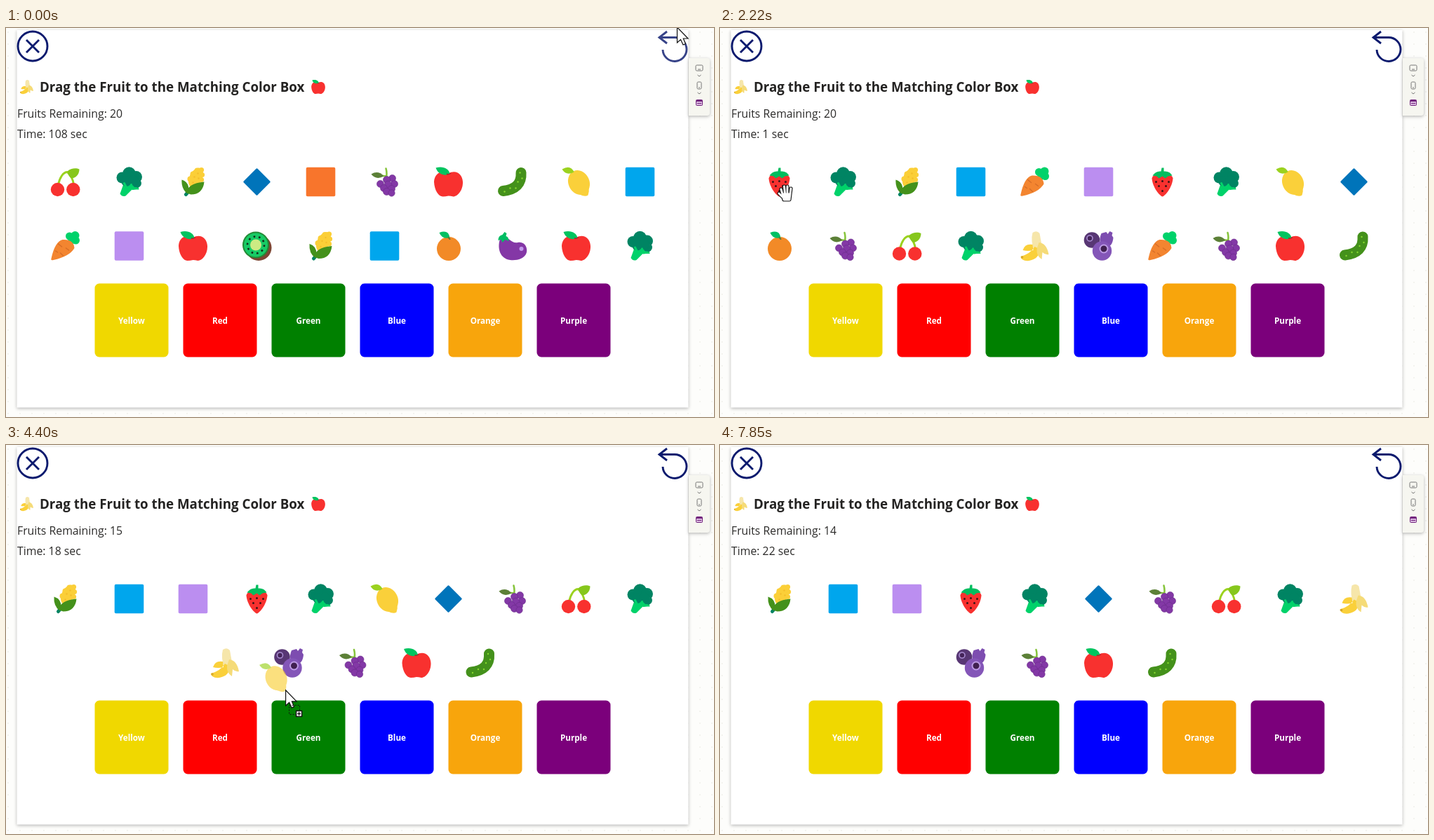
These frames come from a looping animation (1009 by 555 pixels, 8 s). An HTML page:

```html
<!DOCTYPE html>
<html lang="en">
<head>
<meta charset="utf-8">
<title>Fruit color game</title>
<style>
html, body { margin: 0; width: 100%; height: 100%; overflow: hidden; background: #fdfdfb; }
svg { display: block; width: 1009px; height: 555px; font-family: "Open Sans", sans-serif; }
.sheet { filter: drop-shadow(0 1px 2px #0003) drop-shadow(0 2px 2px #8883); }
.info { font-size: 15.8px; fill: #2b2a29; }
.label { font-size: 11.7px; font-weight: 700; fill: #fff; text-anchor: middle; }
.navy { fill: none; stroke: #0b1a6e; stroke-width: 2.9; }
.line { fill: none; stroke-linecap: round; stroke-linejoin: round; }
.tool { fill: none; stroke: #777; stroke-width: 1; }
</style>
</head>
<body>
<svg viewBox="0 0 1009 555">
<defs>
  <pattern id="dots" width="17" height="17" patternUnits="userSpaceOnUse"><circle cx="3" cy="6" r=".8" fill="#e6e6de"/></pattern>

  <g id="h">
    <path class="line" stroke="#9bd21f" stroke-width="3" d="M-10 4C-8-6-3-14 3-14Q11-6 12 4"/>
    <path fill="#86c71c" d="M3-15C8-20 16-20 20-18C20-10 14-5 9-5Q4-8 3-15"/>
    <g fill="#f8312f"><circle cx="-11" cy="11" r="9.7"/><circle cx="11.3" cy="11" r="9.7"/></g>
  </g>
  <g id="b">
    <path fill="#00d26a" d="M-13 17L-8 3L0 0L13 6L14 11L4 11L-5 20Q-10 22-13 17"/>
    <g fill="#008463"><circle cx="-10" cy="-6" r="8"/><circle cx="0" cy="-12" r="9.3"/><circle cx="10" cy="-7" r="8.5"/><circle cx="-4" cy="-1" r="7.5"/><circle cx="11" cy="2" r="6.5"/><circle cx="6" cy="-2" r="7"/></g>
    <path class="line" stroke="#00d26a" stroke-width="3" d="M-4 8L-7 2M1 9L3 4M5 10L10 9"/>
  </g>
  <g id="c">
    <ellipse cx="4" cy="-6" rx="9" ry="15" transform="rotate(27 4 -6)" fill="#fbcf38"/>
    <g fill="#fbcf38"><circle cx="12" cy="-17" r="3.6"/><circle cx="6" cy="-16" r="4"/><circle cx="0" cy="-11" r="4"/><circle cx="13" cy="-10" r="3.6"/><circle cx="12" cy="-3" r="3.6"/><circle cx="-4" cy="-4" r="4"/></g>
    <g fill="#f3bd2b"><circle cx="7" cy="-12" r="1.2"/><circle cx="2" cy="-7" r="1.2"/><circle cx="8" cy="-5" r="1.2"/><circle cx="0" cy="1" r="1.2"/></g>
    <path class="line" stroke="#008463" stroke-width="5" d="M-10 18L-6 13"/>
    <path fill="#44911b" d="M-16-3Q-6 0-6 11L-8 17Q-17 10-16-3M-9 16Q-8 2 16 0Q14 18-3 18Z"/>
  </g>
  <g id="d"><rect x="-14" y="-14" width="28" height="28" rx="1.5" transform="rotate(45)" fill="#0074ba"/></g>
  <g id="o"><rect x="-20.8" y="-20.8" width="41.6" height="41.6" rx="2" fill="#f8752c"/></g>
  <g id="s"><rect x="-20.8" y="-20.8" width="41.6" height="41.6" rx="2" fill="#00a6ed"/></g>
  <g id="p"><rect x="-20.8" y="-20.8" width="41.6" height="41.6" rx="2" fill="#bb8ef0"/></g>
  <g id="g">
    <path class="line" stroke="#86c43c" stroke-width="2.6" d="M2-19Q4-12 2-4M3-8L-6-9"/>
    <path fill="#5c8037" d="M-19-11Q-9-17-1-8Q-12-2-19-11"/>
    <g fill="#8338a6" stroke="#682a88" stroke-width=".6"><circle cx="11" cy="-5" r="5"/><circle cx="3" cy="-3" r="5"/><circle cx="-6" cy="3" r="5"/><circle cx="14" cy="3" r="5"/><circle cx="5" cy="4" r="5.3"/><circle cx="-1" cy="9" r="5"/><circle cx="10" cy="10" r="5"/><circle cx="3" cy="14" r="5"/><circle cx="10" cy="16" r="4.7"/></g>
  </g>
  <g id="a">
    <path fill="#f8312f" d="M0-12C10-18 20-12 20.5 0C21 12 13 21 7 21Q3 20 0 20Q-4 21-8 21C-14 21-20 12-20.5 0C-20-12-10-18 0-12"/>
    <path fill="#00c45f" d="M-18-20C-8-23 1-19 2-11C-6-8-15-11-18-20"/>
    <path class="line" stroke="#b01f2a" stroke-width="1.5" d="M-2-11Q0-10 3-12"/>
  </g>
  <g id="u">
    <path class="line" stroke="#44911b" stroke-width="15" d="M12.5-13Q14 10-13 13"/>
    <g fill="#86d72f"><circle cx="11" cy="-13" r="1.2"/><circle cx="14" cy="-5" r="1.2"/><circle cx="8" cy="0" r="1.2"/><circle cx="5" cy="9" r="1.2"/><circle cx="-3" cy="9" r="1.2"/><circle cx="-11" cy="14" r="1.2"/></g>
  </g>
  <g id="l">
    <ellipse cx="4" cy="1" rx="15" ry="18" transform="rotate(-25 4 1)" fill="#fad03a"/>
    <path fill="#fad03a" d="M5 18Q13 22 17 19Q19 14 18 8Z"/>
    <path fill="#9bd21f" d="M-20-18Q-8-25-3-14Q-14-8-20-18"/>
  </g>
  <g id="t">
    <g fill="#00d26a"><circle cx="6" cy="-14" r="5.5"/><circle cx="14" cy="-15" r="6"/><circle cx="15" cy="-8" r="5.5"/><circle cx="10" cy="-9" r="6"/></g>
    <path fill="#f38530" d="M-20 18Q-15-6-4-9Q12-10 13 3Q6 15-17 20Q-21 21-20 18"/>
    <path class="line" stroke="#d66d27" stroke-width="1.4" d="M-10-3L-5 1M-3 14L-7 10M5 6L1 3M-14 7L-11 9"/>
  </g>
  <g id="k">
    <circle cx="2.5" cy="2.5" r="18.5" fill="#7d4533"/><circle cx="-1.5" cy="-1.5" r="19" fill="#238a35"/>
    <circle cx="-1.5" cy="-1.5" r="17" fill="#18ca65"/><circle cx="-1.5" cy="-1.5" r="8" fill="#cdeb83"/>
    <circle cx="-1.5" cy="-1.5" r="12" fill="none" stroke="#142b18" stroke-width="2.6" stroke-dasharray="2.6 4.94"/>
  </g>
  <g id="n">
    <circle cx=".5" cy="4" r="17" fill="#f28a27"/>
    <path fill="#00c063" d="M-13-19Q0-24 2-12Q-9-9-13-19"/><path class="line" stroke="#5b7836" stroke-width="2" d="M0-12L2-10"/>
  </g>
  <g id="e">
    <path fill="#8437a6" d="M-15-13C-4-14-2-3 8-5C18-7 22 3 20.5 9C18 19 5 21-3 20C-18 18-21 3-18-8Z"/>
    <path fill="#00bd63" d="M-20-8Q-20-15-14-16L-11-20L-8-18L-9-14Q-5-13-5-7L-10-9L-14-5L-16-9Z"/>
    <circle cx="13" cy="4" r="3" fill="#c298ec"/>
  </g>
  <g id="w">
    <path fill="#f8312f" d="M-15-5C-14 8-4 20 0 21C4 20 14 8 15-5C13-15-13-15-15-5"/>
    <path fill="#00bd5e" d="M-14-9Q-9-16-2-15L-1-20H2V-15Q10-16 14-9L8-8L4-5L0-8L-5-5L-8-8Z"/>
    <g fill="#3a1515"><circle cx="-9" cy="0" r="1.5"/><circle cx="0" cy="-1" r="1.5"/><circle cx="9" cy="0" r="1.5"/><circle cx="-5" cy="6" r="1.5"/><circle cx="5" cy="6" r="1.5"/><circle cx="0" cy="13" r="1.5"/></g>
  </g>
  <g id="y">
    <path fill="#f6e6aa" d="M-3-19Q3-23 7-18L11 4Q6 12-1 7Q-6-8-3-19"/>
    <path fill="#fad03a" d="M-3-2Q-14-4-17 6Q-10 8-2 6ZM-20 15Q-6 11 0 1L6 4Q8 18-8 21Q-19 22-20 15"/>
    <path fill="#f5db78" d="M6-5Q17-4 20 12Q15 13 11 9L10 19Q2 14 3 4Z"/>
    <circle cx="-18" cy="16" r="1.8" fill="#d6a72c"/>
  </g>
  <g id="m">
    <path fill="#7d4db0" d="M4-18L11-20L13-17L16-21L20-19L19-15L21-12Q20 2 9 2Q-2-4 4-18"/>
    <circle cx="-9.5" cy="-8.5" r="11.3" fill="#583774"/><circle cx="-12.5" cy="-11" r="4" fill="#442459" stroke="#a78bd0" stroke-width="1.6"/>
    <circle cx="5" cy="7" r="13.7" fill="#8456b8"/><circle cx="7.5" cy="4" r="5.5" fill="#402050" stroke="#bd9be6" stroke-width="2"/>
  </g>

  <path id="arrow" fill="#fff" stroke="#111" stroke-width="1.2" d="M.5 0V22L5.5 17.5L9 25L12.5 23.5L9.3 16H16Z"/>
  <g id="copy">
    <use href="#arrow"/>
    <rect x="5.500" y="21.500" width="15" height="13" fill="none" stroke="#111" stroke-dasharray="2 2"/>
    <rect x="15.500" y="29.500" width="8" height="8" fill="#fff" stroke="#111" stroke-width="1.4"/>
    <path stroke="#111" stroke-width="1.4" d="M17 33.500H22M19.500 31V36"/>
  </g>
  <path id="palm" d="M-7-5L-5 2M-2.500-9L-1.500 1M2-9V1M7-6L6 2M-10 1L-5 6M-5 2H6L5 10H-3Z"/>
  <path id="finger" d="M0 2V14M4.500 10V15M8.500 11V15M12 13V18M-5 15L-1 20M0 14H12V20L9 26H2L-2 19Z"/>
  <g id="grab" class="line"><use href="#palm" stroke="#111" stroke-width="5.200"/><use href="#palm" fill="#fff" stroke="#fff" stroke-width="2.900"/></g>
  <g id="hand" class="line"><use href="#finger" stroke="#111" stroke-width="5.200"/><use href="#finger" fill="#fff" stroke="#fff" stroke-width="2.900"/><path stroke="#111" d="M4.500 11V15M8.500 12V15"/></g>
</defs>

<rect width="1009" height="555" fill="url(#dots)"/>
<rect class="sheet" x="15.500" y="3" width="957" height="538.500" fill="#fff"/>
<path class="sheet" fill="#f6f6f0" d="M973 43H999Q1003 43 1003 47V121Q1003 125 999 125H973Z"/>
<g class="tool">
  <rect x="983" y="53" width="10" height="8" rx="1.500"/><path d="M986 59H990M985.500 67L988 69L990.500 67M985.500 92L988 94L990.500 92"/>
  <rect x="985" y="77" width="6" height="10" rx="1.500"/><path d="M987 85H989"/>
  <g stroke="#72257d"><rect x="983.500" y="102.500" width="9" height="8" rx="1" fill="#d9b8df"/><path stroke-width="2" d="M984 104H992"/><path d="M985 107.500H991"/></g>
</g>
<g class="navy"><circle cx="38" cy="26" r="21"/><path d="M29 17L47 35M47 17L29 35"/></g>
<path id="back" class="navy" d="M942 5L931 13.500L942 22M931 13.500H953A17 17 0 1 1 936 31"/>
<use href="#y" transform="translate(29.500 84) scale(.48)"/>
<text x="48" y="90.500" font-size="18.740" font-weight="700" fill="#242322">Drag the Fruit to the Matching Color Box</text>
<use href="#a" transform="translate(445 84) scale(.48)"/>
<text id="left" class="info" x="16" y="127.700"></text>
<text id="time" class="info" x="16" y="157"></text>
<g id="boxes"></g>
<g id="pool"></g>
<use id="ghost" opacity=".65"/>
<use id="cursor"/>
</svg>

<script>
const $ = id => document.getElementById(id);
const LOOP = 8000;

// Each letter is the id of one piece
const pools = [
  [0, 'hbcdogaulstpakcsneab'],
  [500, 'wbcstpwbldnghbymtgau'],
  [3090, 'cspwbldnghbymgau'],
  [3900, 'cspwbldghbymgau'],
  [5940, 'cspwbdghbymgau']
];
const seconds = [[0, 108], [500, 0], [1400, 1], [2500, 2], [3090, 17], [4100, 18],
  [5080, 19], [6030, 20], [6950, 21], [7850, 22]];

// time, x, y, pointer shape from then on
const moves = [
  [0, 956, -1, 'arrow'], [30, 956, -1, 'arrow'], [120, 952, 8, 'hand'], [240, 948, 17, 'hand'],
  [700, 948, 17, 'hand'], [760, 925, 20, 'arrow'], [1230, 299, 75, 'arrow'], [1330, 299, 75, 'arrow'],
  [1690, 299, 416, 'arrow'], [1890, 299, 416, 'arrow'], [2180, 94, 235, 'grab'], [2300, 94, 235, 'copy'],
  [2680, 290, 396, 'copy'], [2890, 297, 407, 'copy'], [3089, 297, 407, 'copy'], [3090, 690, 419, 'arrow'],
  [3690, 557, 240, 'grab'], [3960, 557, 240, 'copy'], [4690, 314, 408, 'copy'], [4850, 207, 423, 'copy'],
  [6390, 207, 423, 'arrow'], [7120, -25, 105, 'arrow'], [LOOP, -25, 105, 'arrow']
];

const ease = k => k * k * (3 - 2 * k);
const mix = (a, b, k) => a + (b - a) * k;
const current = (list, t) => list.findLast(row => row[0] <= t);

function place(el, id, x, y) {
  el.setAttribute('href', '#' + id);
  el.setAttribute('transform', `translate(${x} ${y})`);
}

function layout(pieces) {
  const start = Math.max(0, 20 - pieces.length) / 2;
  return [...pieces].map((id, i) => {
    const x = 84.5 + 91 * (i < 10 ? i : i - 10 + start);
    return `<use href="#${id}" x="${x}" y="${i < 10 ? 219.5 : 311}"/>`;
  }).join('');
}

function pointer(t) {
  const i = moves.findLastIndex(m => m[0] <= t);
  const a = moves[i], b = moves[i + 1];
  const k = ease((t - a[0]) / (b[0] - a[0]));
  return [mix(a[1], b[1], k), mix(a[2], b[2], k), a[3]];
}

function drawGhost(t, x, y) {
  const ghost = $('ghost');
  let shown = true;
  if (t >= 2300 && t < 3090) place(ghost, 'w', x - 9, y - 15);
  else if (t >= 3960 && t < 5060) place(ghost, 'l', x - 17, y - 18);
  else if (t >= 5060 && t < 5850) {
    const k = ease((t - 5060) / 790);
    place(ghost, 'l', mix(190, 539.5, k), mix(405, 219.5, k));
  } else shown = false;
  ghost.style.display = shown ? '' : 'none';
}

let shownPool;
function frame(now) {
  const t = now % LOOP;
  const pieces = current(pools, t)[1];
  if (pieces !== shownPool) {
    $('pool').innerHTML = layout(pieces);
    $('left').textContent = 'Fruits Remaining: ' + pieces.length;
    shownPool = pieces;
  }
  $('time').textContent = `Time: ${current(seconds, t)[1]} sec`;
  $('back').style.opacity = t < 780 ? .82 : 1;
  const [x, y, shape] = pointer(t);
  drawGhost(t, x, y);
  place($('cursor'), shape, x, y);
  requestAnimationFrame(frame);
}

const colors = { Yellow: '#f0d800', Red: '#f00', Green: '#008000', Blue: '#00f', Orange: '#f8a50c', Purple: '#7b007b' };
$('boxes').innerHTML = Object.entries(colors).map(([name, color], i) =>
  `<rect x="${126.5 + 126 * i}" y="364.5" width="105" height="105" rx="6.5" fill="${color}"/>
   <text class="label" x="${179 + 126 * i}" y="422">${name}</text>`).join('');
requestAnimationFrame(frame);
</script>
</body>
</html>
```
